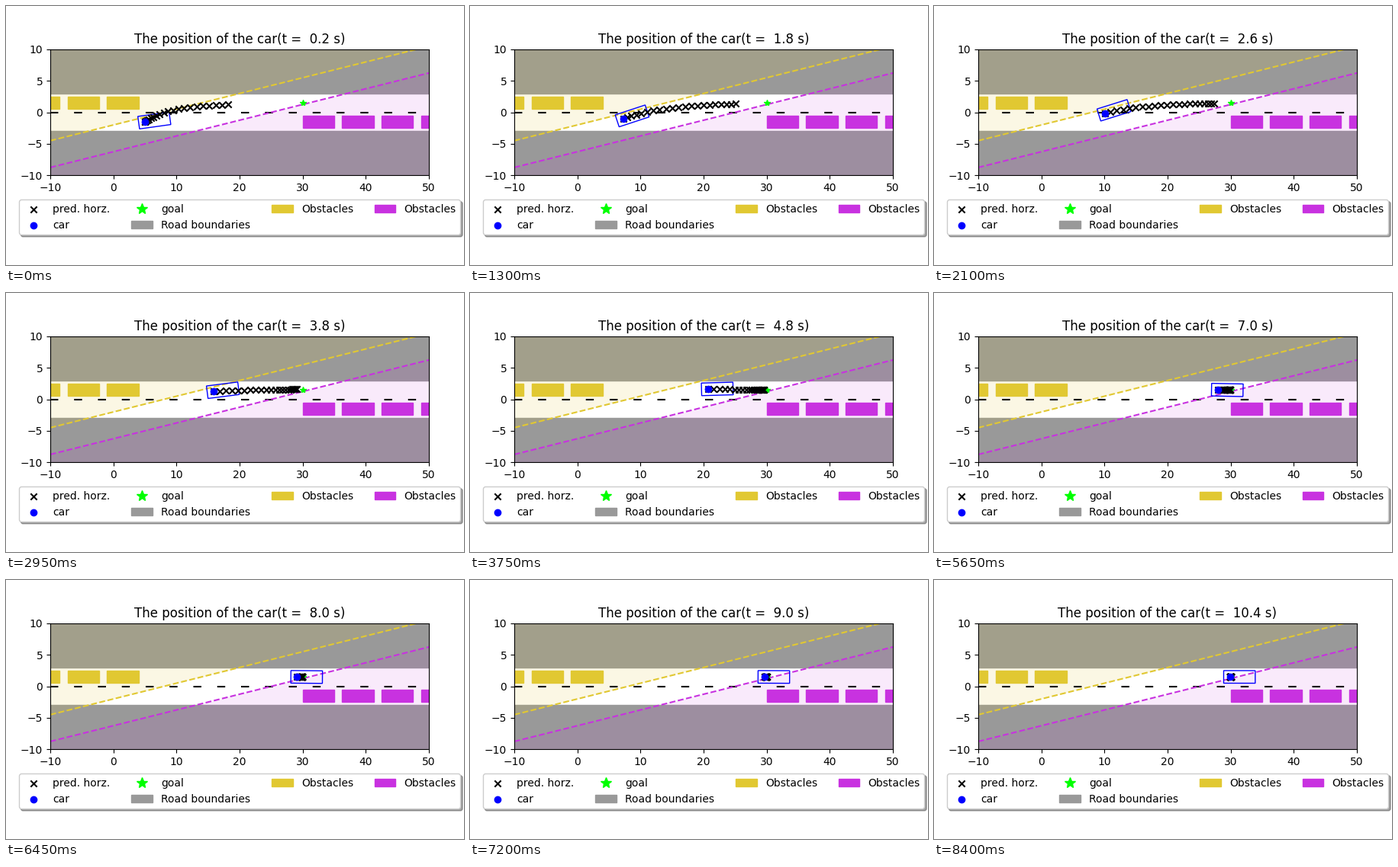
These frames come from a looping animation (600 by 340 pixels, 8.45 s). A matplotlib script:

```python
import numpy as np
import matplotlib.pyplot as plt
from matplotlib.animation import FuncAnimation
from matplotlib.lines import Line2D
from matplotlib.patches import Patch, Polygon, Rectangle

W, H, DPI = 600, 340, 100
FRAMES, INTERVAL = 169, 50
STEPS, DT, HORIZON = 52, 0.2, 20
GOAL = (30, 1.5)
ROAD, GOLD, VIOLET = "#999999", "#e1c832", "#c832e0"

plt.rcParams["font.family"] = "DejaVu Sans"


def drive(n, sub=20):
    """Positions along the road: speed up, cruise at 5 m/s, brake at the goal."""
    x, v = 5.0, 0.0
    xs, vs = [], []
    for i in range(n * sub):
        if i % sub == 0:
            xs.append(x)
            vs.append(v)
        t = (i + 0.5) * DT / sub
        v = min(1.76 * t, 5 * np.tanh((GOAL[0] - x) / 5.8))
        x += v * DT / sub
    return np.array(xs), np.array(vs)


# x, y and slope at a few points of the driven path
KNOTS = np.array([
    (5, -1.5, 0.14), (7.25, -1.04, 0.33), (15.9, 1.26, 0.125),
    (25, 1.6, -0.03), (30, 1.5, 0),
])


def path_y(x):
    """Cubic Hermite curve through the knots."""
    j = int(np.clip(np.searchsorted(KNOTS[:, 0], x) - 1, 0, len(KNOTS) - 2))
    (x0, y0, m0), (x1, y1, m1) = KNOTS[j:j + 2]
    h = x1 - x0
    u = (x - x0) / h
    return (y0 * (2 * u**3 - 3 * u**2 + 1) + m0 * h * (u**3 - 2 * u**2 + u)
            + y1 * (3 * u**2 - 2 * u**3) + m1 * h * (u**3 - u**2))


def heading(x, e=1e-3):
    return np.arctan((path_y(x + e) - path_y(x - e)) / (2 * e))


xs, vs = drive(STEPS + HORIZON + 1)


def prediction(i):
    k = np.arange(HORIZON + 1)
    px = xs[i + k] + 0.004 * k * vs[i + k]
    end = np.interp(i, [0, 8, 18, 28, 40], [1.35, 1.55, 1.65, 1.45, 1.5])
    reach = np.interp(i, [0, 8], [4.2, 6.8])
    py = end + (path_y(xs[i]) - end) * np.exp(-(px - xs[i]) / reach)
    return np.column_stack([px, py])


def outline(x, y, a):
    c, s = np.cos(a), np.sin(a)
    box = np.array([(-1, -1), (4, -1), (4, 1), (-1, 1)])
    return box @ np.array([[c, s], [-s, c]]) + (x, y)


fig = plt.figure(figsize=(W / DPI, H / DPI), dpi=DPI, facecolor="white")
ax = fig.add_axes([58 / W, 117.73 / H, 496 / W, 165.33 / H])
ax.set(xlim=(-10, 50), ylim=(-10, 10),
       xticks=range(-10, 51, 10), yticks=range(-10, 11, 5))


def block(x, y, w, h, color):
    ax.add_patch(Rectangle((x, y), w, h, color=color, lw=1))


# road edges, half planes and parked obstacles
span = np.array([-10, 50])
for y in (-10, 3):
    block(-10, y, 60, 7, ROAD)
upper, lower = 0.25 * span - 2, 0.25 * span - 6.25
ax.fill_between(span, upper, 20, color=GOLD, alpha=0.13, lw=0)
ax.fill_between(span, lower, -20, color=VIOLET, alpha=0.1, lw=0)
for n in range(4):
    block(-1 - 6.25 * n, 0.5, 5, 2, GOLD)
    block(30 + 6.25 * n, -2.5, 5, 2, VIOLET)
ax.plot(span, [0, 0], color="k", lw=1.5, ls=(0, (5, 10)))
ax.plot(span, upper, "--", color=GOLD, lw=1.5)
ax.plot(span, lower, "--", color=VIOLET, lw=1.5)
ax.plot(*GOAL, "*", color="lime", ms=6)

car_box = ax.add_patch(Polygon(outline(5, -1.5, 0), fill=False, ec="b", lw=1, zorder=3))
pred = ax.scatter([], [], s=36, c="k", marker="x", zorder=4, label="pred. horz.")
car = ax.scatter([], [], s=36, c="b", marker="o", zorder=5, label="car")
title = ax.set_title("", fontsize=12)

star = Line2D([], [], ls="", marker="*", ms=10, color="lime", label="goal")
handles = [pred, car, star, Patch(color=ROAD, lw=1, label="Road boundaries"),
           Patch(color=GOLD, lw=1, label="Obstacles"),
           Patch(color=VIOLET, lw=1, label="Obstacles")]
ax.legend(handles=handles, loc="upper center", bbox_to_anchor=(0.5, -0.15),
          ncol=4, fancybox=True, shadow=True, fontsize=10)


def update(frame):
    i = frame * STEPS // FRAMES
    x = xs[i]
    y = path_y(x)
    pred.set_offsets(prediction(i))
    car.set_offsets([(x, y)])
    car_box.set_xy(outline(x, y, heading(x)))
    title.set_text(f"The position of the car(t =  {DT * (i + 1):.1f} s)")
    return pred, car, car_box, title


anim = FuncAnimation(fig, update, frames=FRAMES, interval=INTERVAL,
                     repeat=True, repeat_delay=0, blit=False)
plt.show()
```
